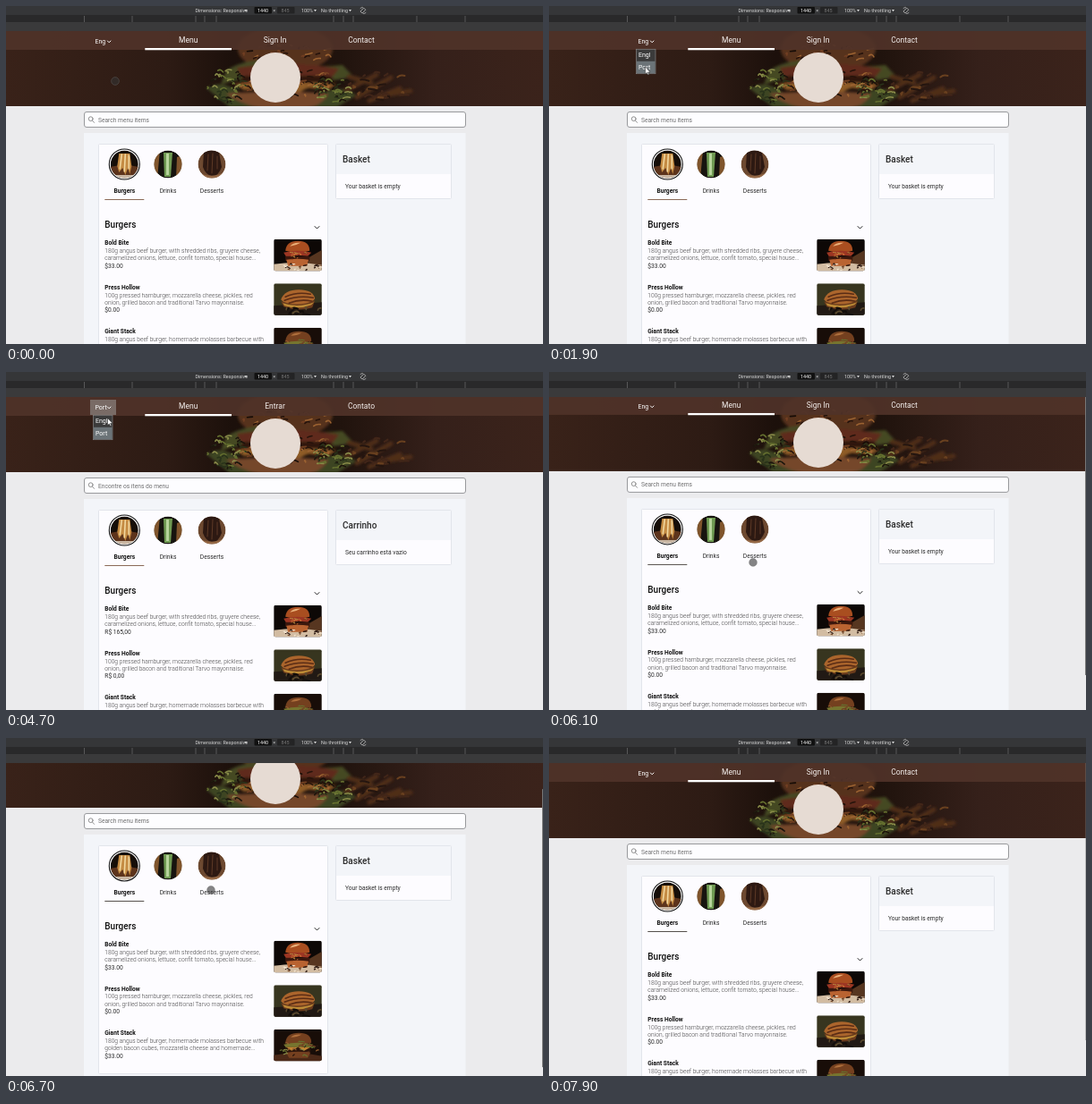
These frames come from a looping animation (600x378 px, 8 s). An HTML page:

```html
<!DOCTYPE html>
<html lang="en">
<head>
<meta charset="utf-8">
<style>
html, body { margin: 0; width: 100%; height: 100%; overflow: hidden; background: #ebebed; }
svg { display: block; width: 600px; height: 378px; font: 6.67px Roboto, sans-serif; fill: #2b2b2b; }
.mid { text-anchor: middle; }
.nav { font-size: 8.5px; fill: #f3eeec; text-anchor: middle; }
.head { font-size: 10px; font-weight: 500; }
.bold { font-weight: 600; fill: #111; }
.desc { font-weight: 300; fill: #444; }
.tool { font-size: 5.4px; fill: #d8d8d8; }
.sel { font-size: 7px; fill: #fff; }
.line { fill: none; stroke-linecap: round; stroke-linejoin: round; }
</style>
</head>
<body>
<svg viewBox="0 0 600 378">
  <defs>
    <clipPath id="view"><rect y="27" width="600" height="351"/></clipPath>
    <clipPath id="bannerClip"><rect y="28" width="600" height="84"/></clipPath>
    <clipPath id="photoClip"><rect width="53.5" height="35.5" rx="2"/></clipPath>
    <clipPath id="disc"><circle r="15.5"/></clipPath>
    <filter id="soft"><feGaussianBlur stdDeviation="1.5"/></filter>
    <filter id="fine"><feGaussianBlur stdDeviation=".6"/></filter>
    <linearGradient id="dark">
      <stop offset="0" stop-color="#392219"/><stop offset=".3" stop-color="#2d1b14"/>
      <stop offset=".42" stop-color="#1c100b"/><stop offset=".62" stop-color="#20130d"/>
      <stop offset=".8" stop-color="#35201a"/><stop offset="1" stop-color="#3b231b"/>
    </linearGradient>
  </defs>

  <g clip-path="url(#view)">
    <rect width="600" height="378" fill="#ebebed"/>
    <g id="page">
      <g clip-path="url(#bannerClip)">
        <rect y="28" width="600" height="84" fill="url(#dark)"/>
        <g filter="url(#soft)">
          <ellipse cx="312" cy="48" rx="53" ry="26" fill="#56301d"/>
          <path d="M246 72Q272 56 310 63T376 66L388 79Q350 88 312 82T240 88Z" fill="#454a24"/>
          <path d="M258 69Q315 60 372 70L365 79H262Z" fill="#5f2a1b"/>
          <rect x="262" y="78" width="104" height="15" rx="6" fill="#2f190e"/>
          <path d="M255 87Q310 82 369 88L358 94L338 91L320 101L298 91L266 94Z" fill="#8e5b28"/>
          <path d="M224 92Q240 82 257 94T295 99L354 97Q377 87 391 100L370 113H250Z" fill="#3c4522"/>
          <path d="M246 98Q312 93 360 98Q352 117 312 117T246 98Z" fill="#74462a"/>
          <path class="line" d="M380 94l34-17M392 102l38-22M406 106l34-14M426 99l26-4M383 79l25 7" stroke="#4f2d19" stroke-width="5"/>
        </g>
        <g id="texture" class="line" filter="url(#fine)"></g>
        <circle cx="301" cy="80" r="28" fill="#e6dbd3"/>
        <rect y="28" width="600" height="21" fill="#503229" opacity=".92"/>
      </g>
      <rect x="155.3" y="47" width="96.7" height="2.3" fill="#fff"/>
      <text class="nav" x="203.7" y="41">Menu</text>
      <text class="nav" x="300.5" y="41" data-en="Sign In" data-pt="Entrar"></text>
      <text class="nav" x="397" y="41" data-en="Contact" data-pt="Contato"></text>
      <rect id="press" x="94" y="31" width="29" height="17" fill="#a5a5a5" opacity=".5"/>
      <text class="sel" x="99.5" y="42.3" data-en="Eng" data-pt="Port"></text>
      <path class="line" d="M113.4 39l1.8 1.8 1.8-1.8" stroke="#fff"/>

      <rect x="87.5" y="118.5" width="426" height="17" rx="2.5" fill="#fdfdff" stroke="#98999c"/>
      <g class="line" stroke="#777" stroke-width=".8"><circle cx="94.7" cy="126.2" r="2.4"/><path d="M96.6 128.2l2 2.2"/></g>
      <text x="103" y="129.5" fill="#707070" data-en="Search menu items" data-pt="Encontre os ítens do menu"></text>

      <rect x="87" y="142" width="426.5" height="281" fill="#f3f5f9"/>
      <g fill="#fdfcff" stroke="#e2e5eb">
        <rect x="103.5" y="154.5" width="256" height="255" rx="1"/>
        <rect x="368.5" y="154.5" width="129" height="61" rx="1"/>
      </g>
      <rect x="369" y="155" width="128" height="33" fill="#f3f5f9"/>
      <text class="head" x="376" y="175.3" data-en="Basket" data-pt="Carrinho"></text>
      <text x="379" y="204.2" data-en="Your basket is empty" data-pt="Seu carrinho está vazio"></text>

      <circle cx="132.3" cy="177" r="17" fill="#fff" stroke="#111" stroke-width="1.1"/>
      <g transform="translate(132.3 177)" clip-path="url(#disc)">
        <circle r="15.5" fill="#160e08"/>
        <g filter="url(#fine)">
          <path d="M-16 3Q0-1 16 3V17H-16Z" fill="#5d341c"/>
          <path d="M-6-12H6L8 2 6 11 4 4 1 12-2 4-6 9-8 2Z" fill="#c48b43"/>
          <path class="line" d="M-3-11L-5 5M1-11L0 8M5-10L5 5" stroke="#f1d79f" stroke-width="1.6"/>
          <path d="M-10 12H10V16H-10Z" fill="#c9b6a2"/>
        </g>
      </g>
      <g transform="translate(181 177)" clip-path="url(#disc)">
        <circle r="15.5" fill="#17140f"/>
        <g filter="url(#fine)">
          <path d="M-16-16H-9L-12 16H-16ZM10-8L16-10V16H9Z" fill="#80552c"/>
          <path d="M-5-13H5L3 14H-4Z" fill="#6f9a52"/>
          <path d="M-2-12H1L1 12H-2Z" fill="#b7d49c"/>
        </g>
      </g>
      <g transform="translate(230 177)" clip-path="url(#disc)">
        <circle r="15.5" fill="#6d4930"/>
        <g filter="url(#fine)"><path d="M-9-14Q0-18 8-13L11 3Q7 14 0 13T-10 3Z" fill="#2d1912"/><path class="line" d="M-4-11L-5 7M1-12L0 10M6-9L6 5" stroke="#5d3926"/><path d="M-16 9Q0 17 16 8V17H-16Z" fill="#946845"/></g>
      </g>
      <text class="mid bold" x="132.3" y="209">Burgers</text>
      <text class="mid" x="181" y="209">Drinks</text>
      <text class="mid" x="230" y="209">Desserts</text>
      <rect id="tab" x="110.3" y="216" width="44" height="1"/>

      <text class="head" x="110.3" y="248.3" style="fill:#111">Burgers</text>
      <path class="line" d="M345 246.5l2.5 2.5 2.5-2.5" stroke="#222"/>
      <g id="items"></g>
    </g>
    <g id="popup">
      <rect x="97.5" y="48.3" width="21.5" height="27.4" fill="#3b3b3b" stroke="#858585" stroke-width=".7"/>
      <rect x="98" y="61.8" width="20.6" height="13.4" fill="#6c7478"/>
      <text class="sel" x="100" y="57">Engl</text>
      <text class="sel" x="100" y="70.5">Port</text>
    </g>
    <rect id="thumb" x="599" width="1" height="311" fill="#777"/>
  </g>

  <rect width="600" height="28" fill="#3a3a3b"/>
  <rect width="600" height="10" fill="#353638"/>
  <rect y="10" width="600" height="8" fill="#29292a"/>
  <path d="M87.5 11v7m53.5-7v7m71-7v7m10-7v7m13-7v7m131-7v7m11-7v7m11-7v7m71-7v7m54-7v7" stroke="#666" stroke-width=".8"/>
  <rect x="277.5" y="1" width="19.5" height="7.5" rx="1" fill="#111"/>
  <rect x="303" y="1" width="19.5" height="7.5" rx="1" fill="#242425"/>
  <g class="tool">
    <text x="211.5" y="6.7">Dimensions: Responsive</text>
    <text x="281" y="6.7" style="fill:#fff">1440</text><text x="298.3" y="6.7">×</text>
    <text x="307.5" y="6.7" style="fill:#777">845</text>
    <text x="330" y="6.7">100%</text><text x="352" y="6.7">No throttling</text>
    <path d="M266.5 4h3l-1.5 2.2zM344 4h3l-1.5 2.2zM383 4h3l-1.5 2.2z"/>
  </g>
  <g class="line" stroke="#bbb" stroke-width=".8"><rect x="396.5" y="3.5" width="5" height="3" transform="rotate(-45 399 5)"/><path d="M396 2.5q1-1 2.5-1M402 7.5q-1 1-2.5 1"/></g>

  <circle id="touch" r="4.4" fill="#333" fill-opacity=".6" stroke="#666" stroke-opacity=".5" stroke-width=".8"/>
  <path id="arrow" d="M0 0V8L1.9 6.4 3.1 9 4.3 8.4 3.1 6H5.6Z" fill="#fff" stroke="#222" stroke-width=".5"/>
</svg>
<script>
const $ = id => document.getElementById(id);
const LOOP = 8000;

let seed = 7;
const rand = () => (seed = seed * 16807 % 2147483647) / 2147483647;

// Short random strokes scattered over an ellipse
function flecks(cx, cy, rx, ry, count, size, colors) {
  return Array.from({ length: count }, () => {
    const angle = rand() * 2 * Math.PI, r = Math.sqrt(rand());
    const x = cx + rx * r * Math.cos(angle), y = cy + ry * r * Math.sin(angle);
    const color = colors[Math.floor(rand() * colors.length)];
    return `<path d="M${x} ${y}q${size * rand()} ${-size * rand()} ${size * 2 * rand()} ${size * (rand() - .5)}" stroke="${color}" stroke-width="${size * .4}"/>`;
  }).join('');
}

const greens = ['#65702f', '#29321a', '#8a8c49', '#1c140c'];
const meats = ['#713e22', '#26130b', '#9b6231', '#160c07'];
$('texture').innerHTML =
  flecks(245, 90, 20, 20, 45, 4, greens) + flecks(364, 95, 22, 15, 45, 4, greens) +
  flecks(312, 54, 48, 12, 35, 4, meats) + flecks(312, 86, 52, 16, 60, 4, meats) +
  flecks(415, 90, 34, 15, 25, 5, ['#69401f', '#24150f', '#422619']);

// Each photo is drawn in a 54 x 36 box
const glazed = `<rect width="54" height="36" fill="#0d0806"/><g filter="url(#fine)">
  <path d="M36 36L40 20 54 12V36Z" fill="#573620"/>
  <path d="M0 28Q27 24 54 29V36H0Z" fill="#d2bca2"/>
  <path d="M13 13Q14 2 27 2T40 13Q27 17 13 13Z" fill="#a94e20"/>
  <path d="M18 8Q22 3 30 4Q25 7 18 8Z" fill="#ecb27b"/>
  <path d="M11 15Q27 11 42 15L38 19 27 18 14 20Z" fill="#9c3623"/>
  <path d="M13 19H40V24H13Z" fill="#3b170d"/>
  <path d="M14 23Q27 21 39 23L37 30H16Z" fill="#b96331"/></g>
  <g class="line" filter="url(#fine)">${flecks(27, 32, 26, 4, 18, 3, ['#2b1710', '#f5e6d1', '#704326'])}
  ${flecks(26, 18, 12, 5, 14, 2, ['#d47a38', '#56200f', '#c7a04a'])}</g>`;

const grilled = `<rect width="54" height="36" fill="#37351f"/><g filter="url(#fine)">
  <path d="M0 25L54 21V36H0Z" fill="#211914"/>
  <path d="M8 18Q12 7 28 7T46 17Q42 24 27 24T8 18Z" fill="#ab652c"/>
  <path class="line" d="M13 15Q26 9 41 12M12 19Q27 13 44 16M17 22Q30 17 43 20" stroke="#5a2c15" stroke-width="1.6"/>
  <path d="M8 20Q27 27 46 19L43 27Q27 32 11 26Z" fill="#6b3b1c"/>
  <path d="M10 22Q27 28 45 21L42 24Q27 30 12 25Z" fill="#bd8b36"/></g>
  <g class="line" filter="url(#fine)">${flecks(27, 31, 26, 4, 14, 4, ['#5b4a2e', '#120d0a'])}</g>`;

const stacked = `<rect width="54" height="36" fill="#180d08"/><g filter="url(#fine)">
  <path d="M0 29Q27 24 54 30V36H0Z" fill="#4b2918"/>
  <path d="M13 15Q14 4 28 4T42 15Q28 19 13 15Z" fill="#74401f"/>
  <path d="M19 9Q23 5 31 6Q26 9 19 9Z" fill="#b0703d"/>
  <path d="M11 17Q27 13 44 17L40 21 29 22 14 21Z" fill="#76752f"/>
  <path d="M14 20H41V26H14Z" fill="#2c150c"/>
  <path d="M14 20L20 24 27 20 34 24 41 20Z" fill="#c28532"/>
  <path d="M14 26Q27 24 41 26L38 32H17Z" fill="#75401f"/></g>
  <g class="line" filter="url(#fine)">${flecks(27, 22, 23, 9, 28, 3, [...greens, ...meats])}</g>`;

// name, two description lines, price, photo
const dishes = [
  ['Bold Bite', '180g angus beef burger, with shredded ribs, gruyere cheese,', 'caramelized onions, lettuce, confit tomato, special house...', 33, glazed],
  ['Press Hollow', '100g pressed hamburger, mozzarella cheese, pickles, red', 'onion, grilled bacon and traditional Tarvo mayonnaise.', 0, grilled],
  ['Giant Stack', '180g angus beef burger, homemade molasses barbecue with', 'golden bacon cubes, mozzarella cheese and homemade...', 33, stacked]
];

$('items').innerHTML = dishes.map(([name, a, b, price, photo], i) => `
  <g transform="translate(0 ${i * 49.5})">
    <text class="bold" x="110.3" y="267.3">${name}</text>
    <text class="desc" x="110.3" y="276">${a}</text>
    <text class="desc" x="110.3" y="284.4">${b}</text>
    <text x="110.3" y="292.7" data-en="$${price}.00" data-pt="R$ ${price * 5},00"></text>
    <g transform="translate(299.2 260.8)" clip-path="url(#photoClip)">${photo}</g>
  </g>`).join('');

const pointer = [
  [0, 122, 84], [100, 122, 84], [900, 109, 42], [1300, 109, 42], [1800, 107.5, 68], [2150, 107.5, 68],
  [2800, 118, 129], [3200, 347, 208], [3400, 418, 205], [3700, 359, 190], [4400, 107, 42],
  [4600, 107, 42], [4700, 113.5, 51.5], [5100, 112, 55], [5600, 190, 178], [6000, 228, 214],
  [6100, 228, 213], [6700, 229, 170], [7000, 229, 162], [7400, 229, 192], [7800, 229, 214]
];
const scrolling = [[0, 0], [6000, 0], [6100, 1], [6400, 20], [6700, 34], [7000, 42], [7400, 18], [7800, 0]];

// Linear interpolation through [time, ...values]
function at(keys, t) {
  const n = keys.findIndex(k => k[0] > t);
  if (n < 0) return keys.at(-1).slice(1);
  const [a, b] = [keys[n - 1], keys[n]], u = (t - a[0]) / (b[0] - a[0]);
  return a.slice(1).map((v, i) => v + (b[i + 1] - v) * u);
}

const within = (t, a, b) => t >= a && t < b;
const show = (id, on) => $(id).style.display = on ? '' : 'none';
const words = document.querySelectorAll('[data-en]');
let lang;

function draw(now) {
  const t = now % LOOP;
  const next = within(t, 2200, 5200) ? 'pt' : 'en';
  if (next !== lang) {
    lang = next;
    words.forEach(w => w.textContent = w.dataset[lang]);
  }
  const [scroll] = at(scrolling, t), [x, y] = at(pointer, t);
  const open = within(t, 1200, 2100) || within(t, 4600, 5100);
  $('page').setAttribute('transform', `translate(0 ${-scroll})`);
  $('thumb').setAttribute('y', 27 + scroll * 351 / 396);
  $('thumb').style.opacity = t > 7800 ? .4 : 1;
  $('tab').style.fill = t < 5600 ? '#8b6a58' : '#55504c';
  show('thumb', t >= 6000);
  show('popup', open);
  show('press', within(t, 1100, 1400) || within(t, 4550, 4900));
  show('arrow', open);
  show('touch', !open && t < 7800);
  for (const id of ['arrow', 'touch']) $(id).setAttribute('transform', `translate(${x} ${y})`);
  requestAnimationFrame(draw);
}
requestAnimationFrame(draw);
</script>
</body>
</html>
```
